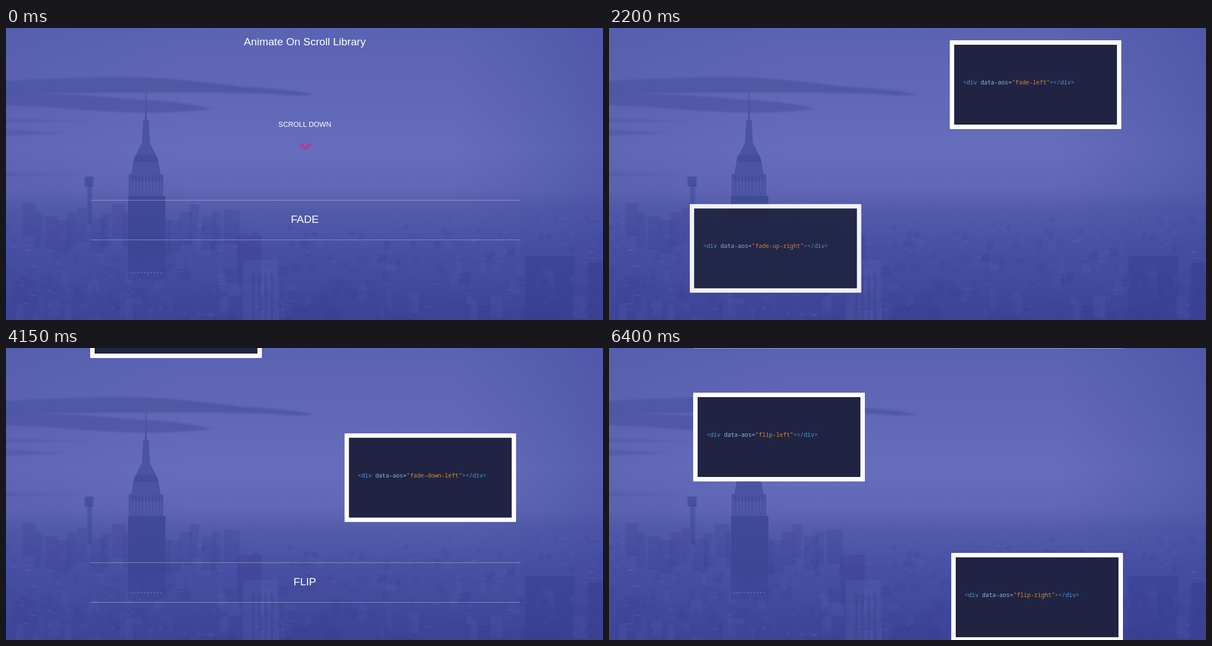
Animation, 1071 px wide and 523 px high, one loop 6500 ms. Source, as an HTML page:

```html
<!DOCTYPE html>
<html lang="en">
<head>
<meta charset="utf-8">
<title>Animate On Scroll Library</title>
<style>
  html, body { margin: 0; width: 100%; height: 100%; overflow: hidden; background: #5a63b0; }
  #stage { position: fixed; inset: 0; overflow: clip; contain: strict; }
  #sky { position: absolute; left: 0; top: 0; width: 1071px; height: 523px; }
  #page { position: absolute; left: 0; top: 0; width: 1071px; height: 523px; color: #fff;
    font-family: "Liberation Sans", Arial, sans-serif; }
  #page > * { position: absolute; }
  .text { left: 1px; width: 1070px; text-align: center; white-space: pre; line-height: 24px; font-size: 19.2px; }
  .small { font-size: 12.8px; }
  .rule { left: 152px; width: 770px; height: 1px; background: rgba(255, 255, 255, .35); }
  .card { box-sizing: border-box; width: 308px; height: 159px; border: 8px solid #fff; border-radius: 1px;
    background: #202442; backface-visibility: hidden; }
  .card code { position: absolute; left: 16px; top: 59px; line-height: 16px; white-space: pre;
    font-size: 10.4px; font-family: "Noto Sans Mono", "DejaVu Sans Mono", monospace; color: #93b6e2; }
  .card b { font-weight: normal; color: #4c9bd8; }
  .card i { font-style: normal; color: #d08a3c; }
  #arrow { left: 524px; top: 202px; }
</style>
</head>
<body>
<div id="stage">
  <svg id="sky" viewBox="0 0 1071 523">
    <defs>
      <linearGradient id="air" x1="0" y1="0" x2="0" y2="1">
        <stop offset="0" stop-color="#5a63b2"/>
        <stop offset=".2" stop-color="#6067b6"/>
        <stop offset=".42" stop-color="#666dbc"/>
        <stop offset=".55" stop-color="#6067b6"/>
        <stop offset=".62" stop-color="#535bab"/>
        <stop offset=".74" stop-color="#4851a4"/>
        <stop offset="1" stop-color="#3b4396"/>
      </linearGradient>
      <linearGradient id="side">
        <stop offset="0" stop-color="#434c9f" stop-opacity=".2"/>
        <stop offset=".3" stop-color="#434c9f" stop-opacity="0"/>
        <stop offset=".75" stop-color="#434c9f" stop-opacity="0"/>
        <stop offset="1" stop-color="#3d469c" stop-opacity=".4"/>
      </linearGradient>
      <linearGradient id="wall" x1="0" y1="0" x2="0" y2="1">
        <stop offset="0" stop-color="#414a99"/>
        <stop offset=".6" stop-color="#3d4596"/>
        <stop offset="1" stop-color="#3b4396" stop-opacity=".4"/>
      </linearGradient>
      <filter id="soft" x="-10%" y="-60%" width="120%" height="220%"><feGaussianBlur stdDeviation="4 1.6"/></filter>
      <filter id="haze"><feGaussianBlur stdDeviation="1 .6"/></filter>
    </defs>
    <rect width="1071" height="523" fill="url(#air)"/>
    <rect width="1071" height="523" fill="url(#side)"/>
    <g filter="url(#soft)" fill="#4c55a3">
      <path opacity=".8" d="M-20 96Q110 88 240 88Q330 92 420 105Q520 110 552 119Q530 123 480 118Q300 112 -20 119Z"/>
      <path opacity=".75" d="M-20 118Q120 116 230 128Q330 132 368 145Q260 160 60 140L-20 138Z"/>
      <path opacity=".5" d="M-20 163L150 166L-20 169ZM-20 181L105 188L-20 194ZM-20 260L125 261L-20 266Z"/>
    </g>
    <g id="town" filter="url(#haze)"></g>
    <g id="tower">
      <path fill="#4b54a2" d="M250.4 112H251.6L253 165H256L258 205L273 236L277 262H282V301H220V262H225L229 236L244 205L246 165H249Z"/>
      <path fill="#3f4898" opacity=".55" d="M231 228H270L273 240H229ZM222 264H281V274H222Z"/>
      <rect x="219" y="301" width="67" height="150" fill="url(#wall)"/>
    </g>
  </svg>
  <div id="page">
    <div class="text" style="top:13px">Animate On Scroll Library</div>
    <div class="text small" style="top:161px">SCROLL DOWN</div>
    <svg id="arrow" width="28" height="20"><path d="M5 6L13.5 13.5L22 6" fill="none" stroke="#b43a98" stroke-width="4.6" stroke-linecap="round"/></svg>
  </div>
</div>
<script>
const LOOP = 6500, STEP = 50;
const REVEAL = 800, SHIFT = 80, GAP = 287;
const TRIGGER = 403, CHECK_DELAY = 60;
const DARK = '#363e8e', LIGHT = '#5b65b2', LAMP = '#8790cc';
const page = document.getElementById('page');

// Scenery
let seed = 11;
const rnd = () => (seed = seed * 16807 % 2147483647) / 2147483647;

function rect(parent, x, y, width, height, fill, opacity) {
  const r = document.createElementNS('http://www.w3.org/2000/svg', 'rect');
  const attrs = { x, y, width, height, fill, opacity };
  for (const k in attrs) r.setAttribute(k, attrs[k]);
  document.getElementById(parent).append(r);
}

// Blocks and lamps grow towards the viewer
for (let i = 0; i < 320; i++) {
  const near = rnd(), x = rnd() * 1071, y = 328 + 190 * near;
  rect('town', x, y, 5 + 30 * near * rnd(), 5 + 45 * near * rnd(), rnd() < .6 ? DARK : LIGHT, .06 + rnd() * .14);
  rect('town', rnd() * 1071, y, 2 + rnd() * 8, 1, LAMP, .1 + rnd() * .25);
}
for (let x = 30; x < 400; x += 20) rect('town', x, 312 + rnd() * 34, 14 + rnd() * 16, 60, DARK, .2);

// Landmarks
rect('town', 141, 266, 16, 18, DARK, .55);
rect('town', 146, 282, 8, 70, DARK, .4);
rect('town', 415, 371, 44, 90, DARK, .3);
rect('town', 425, 415, 64, 108, LIGHT, .25);
rect('town', 932, 408, 88, 115, DARK, .38);
rect('town', 1044, 420, 27, 103, DARK, .5);
for (let i = 0; i < 4; i++) rect('town', 442 + i * 11, 440, 4, 83, DARK, .45);
for (let i = 0; i < 10; i++) {
  rect('tower', 223 + i * 6, 437 + i % 2, 3, 1.5, LAMP, .6);
  rect('tower', 223 + i * 6, 265, 2, 24 + rnd() * 10, LIGHT, .45);
}

// Scroll position: a few points in time and offset, joined by straight runs
const path = [
  [0, 0], [350, 343], [1170, 630], [1800, 917], [1900, 1204], [2200, 1298],
  [2330, 1491], [2800, 1642], [3600, 2098], [4750, 2566], [5700, 2777]
];

// Look up along the path from one column to the other
function along(value, from, to) {
  const i = path.findIndex(point => point[from] > value);
  if (i < 0) return path[path.length - 1][to];
  const a = path[i - 1], b = path[i];
  return a[to] + (b[to] - a[to]) * (value - a[from]) / (b[from] - a[from]);
}
const scrollAt = t => along(t, 0, 1);
const timeAt = offset => along(offset, 1, 0);

// Page content
function add(cls, top, html = '') {
  const el = document.createElement('div');
  el.className = cls;
  el.style.top = top + 'px';
  el.innerHTML = html;
  page.append(el);
  return el;
}

const cards = [];
function section(top, title, names) {
  add('rule', top);
  add('text', top + 23, title);
  add('rule', top + 71);
  names.forEach((name, i) => {
    const y = top + 151 + GAP * i;
    const el = add('card', y,
      `<code><b>&lt;div</b> data-aos=<i>"${name}"</i><b>&gt;&lt;/div&gt;</b></code>`);
    el.style.left = (i % 2 ? 614 : 151) + 'px';
    const has = word => name.includes(word);
    cards.push({
      el, start: timeAt(y - TRIGGER) + CHECK_DELAY, flip: has('flip'),
      dx: has('left') - has('right'), dy: has('up') - has('down')
    });
  });
}
section(308, 'FADE', ['fade-up', 'fade-down', 'fade-right', 'fade-left', 'fade-up-right', 'fade-up-left',
  'fade-down-right', 'fade-down-left']);
section(2706, 'FLIP', ['flip-left', 'flip-right']);

// cubic-bezier(.175, .885, .32, 1.275)
const bezier = (a, b, s) => 3 * (1 - s) * (1 - s) * s * a + 3 * (1 - s) * s * s * b + s * s * s;
function easeOutBack(x) {
  if (x <= 0) return 0;
  if (x >= 1) return 1;
  let lo = 0, hi = 1;
  for (let i = 0; i < 24; i++) {
    const mid = (lo + hi) / 2;
    if (bezier(.175, .32, mid) < x) lo = mid; else hi = mid;
  }
  return bezier(.885, 1.275, lo);
}

function draw(t) {
  page.style.transform = `translateY(${-Math.round(scrollAt(t))}px)`;
  for (const { el, start, flip, dx, dy } of cards) {
    const p = easeOutBack((t - start) / REVEAL), rest = 1 - p;
    if (flip) {
      el.style.transform = rest ? `perspective(2000px) rotateY(${-100 * dx * rest}deg)` : 'none';
    } else {
      el.style.opacity = Math.min(1, p);
      el.style.transform = rest ? `translate(${SHIFT * dx * rest}px, ${SHIFT * dy * rest}px)` : 'none';
    }
  }
}

const origin = performance.now();
function tick() {
  const t = (performance.now() - origin) % LOOP;
  draw(Math.floor(t / STEP) * STEP);
  requestAnimationFrame(tick);
}
tick();
</script>
</body>
</html>
```
